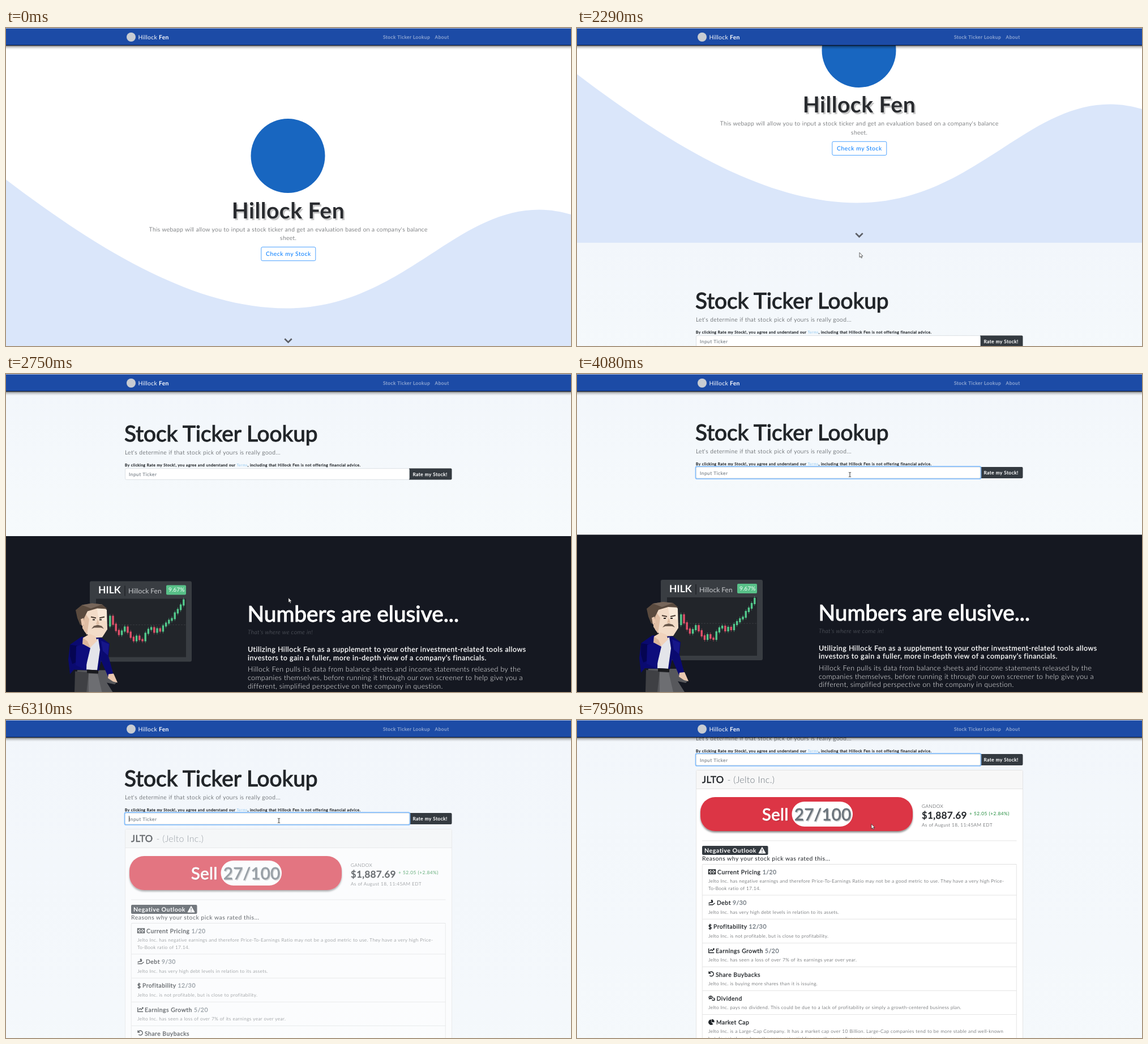
Recreate the animation shown at these times as an HTML page. Size 998x561 px, loop 8000 ms.

```html
<!DOCTYPE html>
<html lang="en">
<head>
<meta charset="utf-8">
<title>Stock Ticker Lookup</title>
<style>
html, body { margin: 0; width: 100%; height: 100%; overflow: hidden; background: #fff; }
svg { display: block; width: 998px; height: 561px; font: 8.32px Lato, sans-serif; letter-spacing: .52px; color: #212529; text-rendering: geometricPrecision; }
text { fill: currentColor; white-space: pre; }
.lead { font-size: 10.4px; }
.big { font-size: 12.48px; }
.light { font-weight: 300; letter-spacing: calc(.52px - .0145em); }
.bold { font-weight: 700; }
.semi { stroke: currentColor; stroke-width: .3; }
.head { stroke: currentColor; stroke-width: 1.1; font-size: 38.8px; letter-spacing: 0; }
.mid { text-anchor: middle; }
</style>
</head>
<body>
<svg viewBox="0 0 998 561">
<defs>
  <linearGradient id="pale" x2="0" y2="1"><stop stop-color="#f2f6fb"/><stop offset="1" stop-color="#f6fafc"/></linearGradient>
  <linearGradient id="shade" x2="0" y2="1"><stop stop-opacity=".5"/><stop offset=".5" stop-opacity=".14"/><stop offset="1" stop-opacity="0"/></linearGradient>
  <filter id="drop" x="-5%" y="-20%" width="110%" height="150%"><feDropShadow dx="0" dy="2.5" stdDeviation="1.8" flood-opacity=".45"/></filter>
</defs>

<g id="page">
  <!-- hero -->
  <path fill="#dae6fa" d="M0 267.5C166 393 333 494.500 495 494.500C697 494.500 790 320.500 942 320.500C962 320.500 980 324 998 329V565H0Z"/>
  <circle cx="498" cy="225.5" r="65.5" fill="#1866c0"/>
  <g class="mid">
    <g class="bold" font-size="39">
      <text x="501" y="338.5" color="#c9c9c9">Hillock Fen</text>
      <text x="498.5" y="335.5" color="#292b2f">Hillock Fen</text>
    </g>
    <g>
      <text class="light lead" x="498.7" y="358.5">This webapp will allow you to input a stock ticker and get an evaluation based on a company's balance</text>
      <text class="light lead" x="498.7" y="374">sheet.</text>
    </g>
    <g id="check">
      <rect x="450.8" y="386.4" width="96" height="24.2" rx="2.4" stroke="#007bff" stroke-width=".7"/>
      <text class="lead" x="498.9" y="402.3">Check my Stock</text>
    </g>
  </g>
  <path id="chevron" d="M492.3 548.2l6.2 6.2 6.2-6.2" fill="none" stroke="#5c5f66" stroke-width="2.7"/>

  <!-- lookup -->
  <rect y="565" width="998" height="1000" fill="url(#pale)" id="lookup"/>
  <text class="head" x="209" y="681">Stock Ticker Lookup</text>
  <text class="light lead" x="210" y="704">Let's determine if that stock pick of yours is really good...</text>
  <text class="semi" x="210" y="725.5" font-size="6.66">By clicking Rate my Stock!, you agree and understand our <tspan class="light" fill="#3d9fe8" stroke="none">Terms</tspan>, including that Hillock Fen is not offering financial advice.</text>
  <path d="M712 728.5h73.5a2 2 0 0 1 2 2v16a2 2 0 0 1-2 2h-73.5z" fill="#343a40"/>
  <text class="semi" x="718.5" y="741.7" color="#fff">Rate my Stock!</text>
  <rect id="ring" x="209.6" y="727.6" width="503.7" height="21.8" rx="2.5" fill="none" stroke="#80bdff" stroke-width="1.9"/>
  <rect x="210.5" y="728.8" width="502" height="19.5" rx="2" fill="#fff" stroke="#ced4da" stroke-width=".7"/>
  <text id="hint" class="semi" x="217" y="742" color="#7b838a" style="stroke-width:.15">Input Ticker</text>
  <text id="typed" x="217" y="742" color="#495057"></text>
  <rect id="caret" y="733.5" width=".9" height="10.5" fill="#333"/>

  <!-- result, in coordinates of the scrolled view -->
  <g id="card" transform="translate(0 564.5)">
    <rect x="210.5" y="192.5" width="577" height="700" rx="2" fill="#fff" stroke="#dfdfdf" stroke-width=".8"/>
    <path d="M211 193h576v32.5H211z" fill="#f7f7f7"/>
    <path d="M211 225.5h576M221 317h555.5" stroke="#dfdfdf" stroke-width=".8"/>
    <text x="221" y="215" font-size="16.64" stroke="currentColor" stroke-width=".6">JLTO</text>
    <text class="light" x="265.5" y="215" font-size="16" color="#6c757d">- (Jelto Inc.)</text>
    <rect x="218" y="240" width="375" height="60" rx="26" fill="#dc3545" filter="url(#drop)"/>
    <rect x="379.5" y="248" width="107.5" height="44" rx="22" fill="#fff"/>
    <g font-size="29.1" stroke-width=".9">
      <text x="328.5" y="282.5" color="#a32c39" opacity=".5">Sell</text>
      <text x="327" y="281" color="#fff" stroke="#fff">Sell</text>
      <text x="385.5" y="282.5" color="#ccc">27/100</text>
      <text x="384" y="281" color="#6c757d" stroke="#6c757d">27/100</text>
    </g>
    <text class="light" x="609" y="259.3">GANDOX</text>
    <text class="semi" x="609" y="278" font-size="16.64" style="stroke-width:.6">$1,887.69</text>
    <text x="693" y="271.5" color="#1f8a3a">+ 52.05 (+2.84%)</text>
    <text class="light" x="609" y="291.5">As of August 18, 11:45AM EDT</text>
    <rect x="221" y="326" width="116.5" height="16" rx="2" fill="#343a40"/>
    <text class="bold" x="225" y="338" font-size="10.6" color="#fff">Negative Outlook</text>
    <path d="M327 328.5l6 10.5h-12z" fill="#fff" stroke="#fff" stroke-linejoin="round"/>
    <path d="M327 331.5v3.8m0 1.2v1.5" stroke="#343a40" stroke-width="1.3"/>
    <text class="lead" x="221" y="352.3">Reasons why your stock pick was rated this...</text>
    <rect x="221.3" y="358.5" width="555" height="500" rx="2" fill="none" stroke="#dfdfdf" stroke-width=".8"/>
    <g id="list"></g>
  </g>

  <!-- dark section -->
  <g id="dark" transform="translate(0 564.5)">
    <path d="M0 283.5h998V900H0z" fill="#151821"/>
    <rect x="148" y="363" width="180" height="142" rx="3" fill="#393d42"/>
    <path d="M159 394h159v103H159z" fill="#22252a"/>
    <path d="M159 440h159" stroke="#43474b" stroke-width=".6" stroke-dasharray="3 2"/>
    <g letter-spacing="0">
      <text class="bold" x="163" y="385" font-size="17.5" color="#fff">HILK</text>
      <text x="216" y="385" font-size="12" color="#c9cbce">Hillock Fen</text>
      <rect x="283" y="370" width="35" height="17" rx="2" fill="#58c088"/>
      <text x="287" y="382" font-size="10.2" color="#f4fff8">9.67%</text>
    </g>
    <path d="M210 371v18" stroke="#22252a" stroke-width="1.5"/>
    <g id="candles"></g>
    <g>
      <path d="M126 520h62l-3 12 11 9 -4 4-14-3 12 19h-69z" fill="#57585c"/>
      <path d="M122 522l24 2-4 37h-21z" fill="#3f4044"/>
      <path d="M146 526l16 1 8 34h-24z" fill="#6d6e72"/>
      <path d="M113 475l20-14 36 2 14 10 -2 22 9 34-9 4-13-30-4 18-44-2-7 8-3-26z" fill="#0a0a70"/>
      <path d="M113 475l13 2 10 24-19 8-4-14z" fill="#050552"/>
      <path d="M168 468l14 6-2 20-9-8z" fill="#16168a"/>
      <path d="M143 478l20-14 3 20-5 36-19-1z" fill="#e4e5ea"/>
      <path d="M143 519l20 1v6l-20-1z" fill="#191a1e"/>
      <path d="M181 527l9-1 7 16-8-2-9-6z" fill="#e9c7ae"/>
      <path d="M135 412l34-8 9 10 1 34-9 14-20 1-12-12z" fill="#f3dcc8"/>
      <path d="M135 412l12 18-4 28-8-12z" fill="#dfbda3"/>
      <path d="M160 408l9-3 9 9v20l-14-4z" fill="#fae9d9"/>
      <path d="M123 414l11-9 18-3 18 2 9 8-18-1-17 5-6 12-1 13-6-1-5-12z" fill="#5a4a3e"/>
      <path d="M134 405l18-3 18 2-20 7z" fill="#77665a"/>
      <path d="M132 430l5-2 2 11-5 3z" fill="#e9c7ae"/>
      <path d="M150 426l9 2m6 0l9-2" stroke="#4a3b31" stroke-width="2"/>
      <path d="M153 431h4m8 0h4" stroke="#25211f" stroke-width="2"/>
      <path d="M162 430l3 9h-6" fill="#dfbda3"/>
      <path d="M151 447l4-5 7-2 7 2 4 5-5-2h-12z" fill="#6b594c"/>
      <path d="M136 463l12-7 10 4 3 8-12 12-14-2z" fill="#f0d2bb"/>
      <path d="M136 463l8 6 5 11-14-2z" fill="#dcb79c"/>
      <path d="M124 478l12-4 13 7-9 38-17-8z" fill="#0d0d7c"/>
    </g>
    <g color="#fff">
      <text class="head" x="426.5" y="435">Numbers are elusive...</text>
      <text class="light lead" x="427" y="457" color="#686c74" font-style="italic">That's where we come in!</text>
      <g class="big semi">
        <text x="427" y="487.5">Utilizing Hillock Fen as a supplement to your other investment-related tools allows</text>
        <text x="427" y="502.3">investors to gain a fuller, more in-depth view of a company’s financials.</text>
      </g>
      <g class="big light">
        <text x="427" y="523">Hillock Fen pulls its data from balance sheets and income statements released by the</text>
        <text x="427" y="537.7">companies themselves, before running it through our own screener to help give you a</text>
        <text x="427" y="552.4">different, simplified perspective on the company in question.</text>
      </g>
    </g>
  </g>
</g>

<!-- top bar -->
<path d="M0 31h998v7H0z" fill="url(#shade)"/>
<path d="M0 0h998v31H0z" fill="#1c4ba6"/>
<path d="M0 .4h998" stroke="#d3dbeb" stroke-width=".9"/>
<path d="M0 30.5h998" stroke="#0a1122"/>
<circle cx="221" cy="16" r="8" fill="#c8ccd2"/>
<text x="233.5" y="19.8" font-size="10.4" color="#fff" style="letter-spacing:.3px">Hillock <tspan class="bold">Fen</tspan></text>
<g class="semi" color="#8da5d2"><text x="666" y="18.7">Stock Ticker Lookup</text><text x="757.5" y="18.7">About</text></g>

<g id="cursor">
  <path d="M0 0v8.3l1.9-1.7 1.3 3 1.4-.6-1.3-2.9h2.6z" fill="#fff" stroke="#222" stroke-width=".7"/>
  <path d="M-.8 1.3q.9-1 1.7 0v3.2l3.3.8q.9.3.8 1.4l-.5 2.6-.8 1.5H.3L-2.500 7.3q0-1.300 1.700-.3z" fill="#fff" stroke="#333" stroke-width=".6"/>
  <path d="M-2-3.5q2 0 2 1 0-1 2-1M0-2.5v6M-2 4.5q2 0 2-1 0 1 2 1" fill="none" stroke="#222" stroke-width=".9"/>
</g>
</svg>

<script>
const $ = id => document.getElementById(id);
const clamp = v => Math.max(0, Math.min(1, v));
const swing = v => .5 - Math.cos(Math.PI * clamp(v)) / 2;
const set = (el, attrs) => { for (const k in attrs) el.setAttribute(k, attrs[k]); };

// [top, text x, title, score, icon path, description lines]
const items = [
  [358.5, 248, 'Current Pricing', '1/20', 'M232.5 368h12v7.5h-12zM238.5 369.8a2 2 0 1 0 .1 0zM233 368.5l2 2m9-2l-2 2m-9 4l2-2m9 2l-2-2',
    'Jelto Inc. has negative earnings and therefore Price-To-Earnings Ratio may not be a good metric to use. They have a very high Price-', 'To-Book ratio of 17.14.'],
  [413, 247, 'Debt', '9/30', 'M232.5 430h7l4-3M232.5 427.5l3-1.5h4M239.5 422h-2v1.5h2v1.5h-2',
    'Jelto Inc. has very high debt levels in relation to its assets.'],
  [455.3, 241, 'Profitability', '12/30', 'M237.3 466.5c-1-1.5-4.2-1.5-4.2.7s4.2 1.200 4.2 3.500-3.500 2.300-4.500.6M235 463.500v10.500',
    'Jelto Inc. is not profitable, but is close to profitability.'],
  [497.5, 245, 'Earnings Growth', '5/20', 'M232.7 507v7.5h9.5M234.5 511.5l2.5-2.5 2 2 3-3.5m-2 0h2v2',
    'Jelto Inc. has seen a loss of over 7% of its earnings year over year.'],
  [539.5, 245, 'Share Buybacks', '', 'M233 547.5v3.5h3.5M233.5 550.5a4 4 0 1 1 .8 4.3',
    'Jelto Inc. is buying more shares than it is issuing.'],
  [581.5, 246.5, 'Dividend', '', 'M236 591a3 2.3 0 1 0 .1 0zM233 596.5l1.5-1M236 592v3.5M240.5 594.5a2.5 2 0 1 1-2 3m4.5 1.5l-1-1',
    'Jelto Inc. pays no dividend. This could be due to a lack of profitability or simply a growth-centered business plan.'],
  [623.5, 246, 'Market Cap', '', 'M236.5 633v4.5l3 3a4.2 4.2 0 1 1-3-7.5M238.5 632.5a4 4 0 0 1 3.5 4h-3.5z',
    'Jelto Inc. is a Large-Cap Company. It has a market cap over 10 Billion. Large-Cap companies tend to be more stable and well-known',
    'but do not always have the same potential for growth as smaller companies.'],
];
$('list').innerHTML = items.map(([y, x, title, score, icon, ...lines]) =>
  `<path d="M221.5 ${y}h555" stroke="#dfdfdf" stroke-width=".8"/>
  <path d="${icon}" fill="${title == 'Market Cap' ? '#212529' : 'none'}" stroke="#212529" stroke-width="1.4"/>
  <text class="lead semi" x="${x}" y="${y + 17}">${title}<tspan fill="#6c757d" stroke="#6c757d"> ${score}</tspan></text>` +
  lines.map((s, i) => `<text class="light" x="232" y="${y + 32.5 + i * 12.5}">${s}</text>`).join('')).join('');

const closes = [441, 424, 438, 449, 456, 450, 443, 452, 461, 467, 459, 465, 467, 454, 447, 444, 452, 446, 450, 441, 436, 431, 428, 418, 412, 404, 395];
$('candles').innerHTML = closes.slice(1).map((c, i) => {
  const open = closes[i], x = 183.8 + i * 5.2, top = Math.min(open, c), low = Math.max(open, c) + 2;
  return `<path d="M${x - 1.7} ${top}h3.4V${low}h-3.4zM${x - .3} ${top - 3}h.6V${low + 3}h-.6z" fill="${c < open ? '#52c98c' : '#e2506a'}"/>`;
}).join('');

// pointer stops: [time, x, y]
const route = [[30, 914, 348], [820, 548, 362], [1350, 499, 397], [2720, 499, 396], [3380, 482, 177], [6960, 482, 177], [7190, 520, 183.5]];
function pointer(t) {
  let i = route.findIndex(p => p[0] > t);
  if (i < 0) return route[route.length - 1].slice(1);
  if (i < 1) i = 1;
  const [a, b] = [route[i - 1], route[i]], k = swing((t - a[0]) / (b[0] - a[0]));
  return [a[1] + (b[1] - a[1]) * k, a[2] + (b[2] - a[2]) * k];
}

const between = (t, a, b) => t >= a && t < b;
const keys = [4630, 5050, 5190, 5370];
const [box, label] = $('check').children;

function draw(t) {
  const scroll = 564.5 * swing((t - 1976) / 809) + 52 * swing((t - 7240) / 210) + 52 * swing((t - 7750) / 195);
  set($('page'), { transform: `translate(0 ${-scroll})` });
  set($('chevron'), { transform: `translate(0 ${t < 1000 ? 3 * Math.sin(Math.PI * t / 1000) : 0})` });

  const hover = swing((t - 1150) / 200) - swing((t - 2090) / 200);
  set($('check'), { transform: `translate(498.5 398.5) scale(${1 + .15 * hover}) translate(-498.5 -398.5)` });
  set(box, { fill: `rgba(0,123,255,${hover})` });
  set(label, { color: `rgb(${255 * hover},${123 + 132 * hover},255)` });

  const sent = t >= 5930;
  const word = sent ? '' : 'JLTO'.slice(0, keys.filter(k => t >= k).length);
  $('typed').textContent = word;
  set($('hint'), { visibility: word ? 'hidden' : 'visible' });
  const lit = between(t, 3570, 4080) || between(t, 4590, 6460) || between(t, 6970, 7490);
  set($('caret'), { x: 217 + (word ? $('typed').getComputedTextLength() : 0), opacity: +lit });
  set($('ring'), { opacity: clamp((t - 3510) / 150) });

  set($('card'), { opacity: clamp((t - 5950) / 540) });
  set($('dark'), { visibility: sent ? 'hidden' : 'visible' });
  set($('lookup'), { height: sent ? 1000 : 283 });

  const [x, y] = pointer(t);
  set($('cursor'), { transform: `translate(${x} ${y})`, visibility: t < 30 ? 'hidden' : 'visible' });
  const kind = between(t, 1150, 2090) ? 1 : between(t, 3340, 7050) ? 2 : 0;
  [...$('cursor').children].forEach((c, i) => set(c, { display: i == kind ? 'inline' : 'none' }));
}

const start = performance.now();
function tick(now) {
  draw(Math.max(0, now - start) % 8000);
  requestAnimationFrame(tick);
}
draw(0);
requestAnimationFrame(tick);
</script>
</body>
</html>
```
